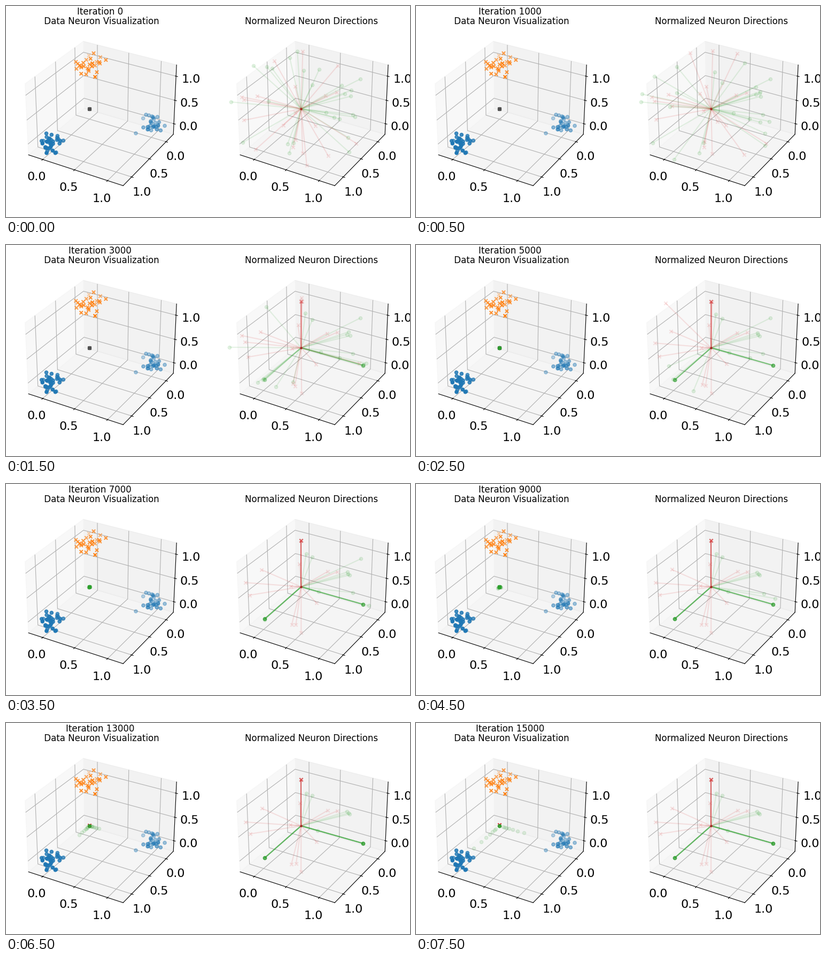
These frames come from a looping animation (756 by 396 pixels, 8 s). A matplotlib script:

```python
import numpy as np
import matplotlib.pyplot as plt
from matplotlib.animation import FuncAnimation
from matplotlib.collections import LineCollection
from matplotlib.colors import to_rgba

W, H, DPI = 756, 396, 100
STEPS, INTERVAL = 16, 500
SIDE, BOTTOM = 315.2, 38.9                    # 3D axes, in pixels
LEFTS = (18.3, 414.3)
HOME, HUB = np.array([156, 193]), np.array([552.3, 193])   # data origin on screen
BASIS = np.array([[116, 33], [-68, 60], [0, -87]])         # unit axes on screen
GREEN, RED, DARK = "tab:green", "tab:red", "#4c4c4c"
FAINT = 0.12

rng = np.random.default_rng(7)
fig = plt.figure(figsize=(W / DPI, H / DPI), dpi=DPI, facecolor="white")


def cube(left, label):
    ax = fig.add_axes([left / W, BOTTOM / H, SIDE / W, SIDE / H], projection="3d")
    pad = 1.4 / 48
    lim, ticks = (-0.2 - pad, 1.2 + pad), (0, 0.5, 1)
    ax.set(xlim=lim, ylim=lim[::-1], zlim=lim, xticks=ticks, yticks=ticks, zticks=ticks)
    ax.tick_params(labelsize=16, pad=4.2)
    ax.patch.set_visible(False)
    return ax, ax.set_title(label, pad=5.5, linespacing=1.05)


ax_data, title = cube(LEFTS[0], "")
cube(LEFTS[1], "Normalized Neuron Directions")


def cluster(center, n):
    return rng.normal(center, 0.095, (n, 3))


blue = np.vstack([cluster((0.04, 1, 0), 36), cluster((1, 0, 0), 30)])
ax_data.scatter(*blue.T, color="tab:blue")
ax_data.scatter(*cluster((0, 0, 0.95), 28).T, color="tab:orange", marker="x")

# Neurons are laid over both cubes in pixel coordinates.
top = fig.add_axes([0, 0, 1, 1])
top.set(xlim=(0, W), ylim=(H, 0))
top.axis("off")


def dots(pts, color, alpha, marker="o", s=20, z=3):
    x, y = np.reshape(pts, (-1, 2)).T
    return top.scatter(x, y, s=s, color=to_rgba(color, alpha), marker=marker, zorder=z)


def unit(v):
    return v / np.linalg.norm(v, axis=1, keepdims=True)


def swarm(n, goals, late, rest):
    """Random directions that turn to a goal axis, plus some that settle at rest."""
    start = unit(rng.normal(size=(n, 3)))
    goal = np.eye(3)[[max(goals, key=lambda a: v[a]) for v in start]]
    turn = 1 + late * np.linspace(0, 1, n) ** 4
    drift = rng.normal(0, 8, (len(rest), 2))

    def tips(k):
        p = 1 / (1 + np.exp((turn - k) / 0.4))[:, None]
        turning = HUB + unit(start * (1 - p) + goal * p) @ BASIS
        return np.vstack([turning, rest + drift * np.exp(-k / 3)])

    return tips


def fan(tips, color, marker, z):
    rays = LineCollection([], colors=color, alpha=FAINT, linewidths=1.5, zorder=z)
    top.add_collection(rays, autolim=False)
    return tips, rays, dots(tips(0), color, FAINT, marker, z=z + 1)


green_rest = [(583, 202), (562, 132), (573, 136), (638, 166), (641, 169), (643, 171)]
red_rest = [(550, 150), (479, 160), (532, 191), (602, 164), (620, 165), (448, 186),
            (457, 208), (581, 223), (534, 265), (543, 264), (552, 279)]
fans = [fan(swarm(20, (0, 1), 9, green_rest), GREEN, "o", 2),
        fan(swarm(9, (2,), 4, red_rest), RED, "x", 2.5)]
dots(HUB, "#a52424", 1, s=4, z=5)

# Weights: a tight blob that grows along the two blue data directions.
reach = np.vstack([np.outer(np.geomspace(0.1, 0.7, 7), BASIS[1]),
                   np.outer(np.geomspace(0.06, 0.4, 7), BASIS[0])])
trail = dots(reach, GREEN, FAINT)
cross = dots(HOME, DARK, 1, "x", z=4)
blob = dots(HOME, DARK, 0.9, z=4.1)


def update(k):
    title.set_text(f"Iteration {1000 * k}\n Data Neuron Visualization")
    for tips, rays, marks in fans:
        ends = tips(k)
        rays.set_segments([(HUB, e) for e in ends])
        marks.set_offsets(ends)
    growth = np.exp(0.46 * (k - STEPS + 1))
    trail.set_offsets(HOME + reach * growth)
    trail.set_visible(k > 4)
    cross.set_offsets([HOME - (0, 2 * growth)])
    cross.set_color(DARK if k < 6 else GREEN if k < 13 else RED)
    blob.set_color(to_rgba(DARK if k < 4 else GREEN, 0.9))
    return []


anim = FuncAnimation(fig, update, frames=STEPS, interval=INTERVAL,
                     repeat=True, repeat_delay=0, blit=False)
plt.show()
```
